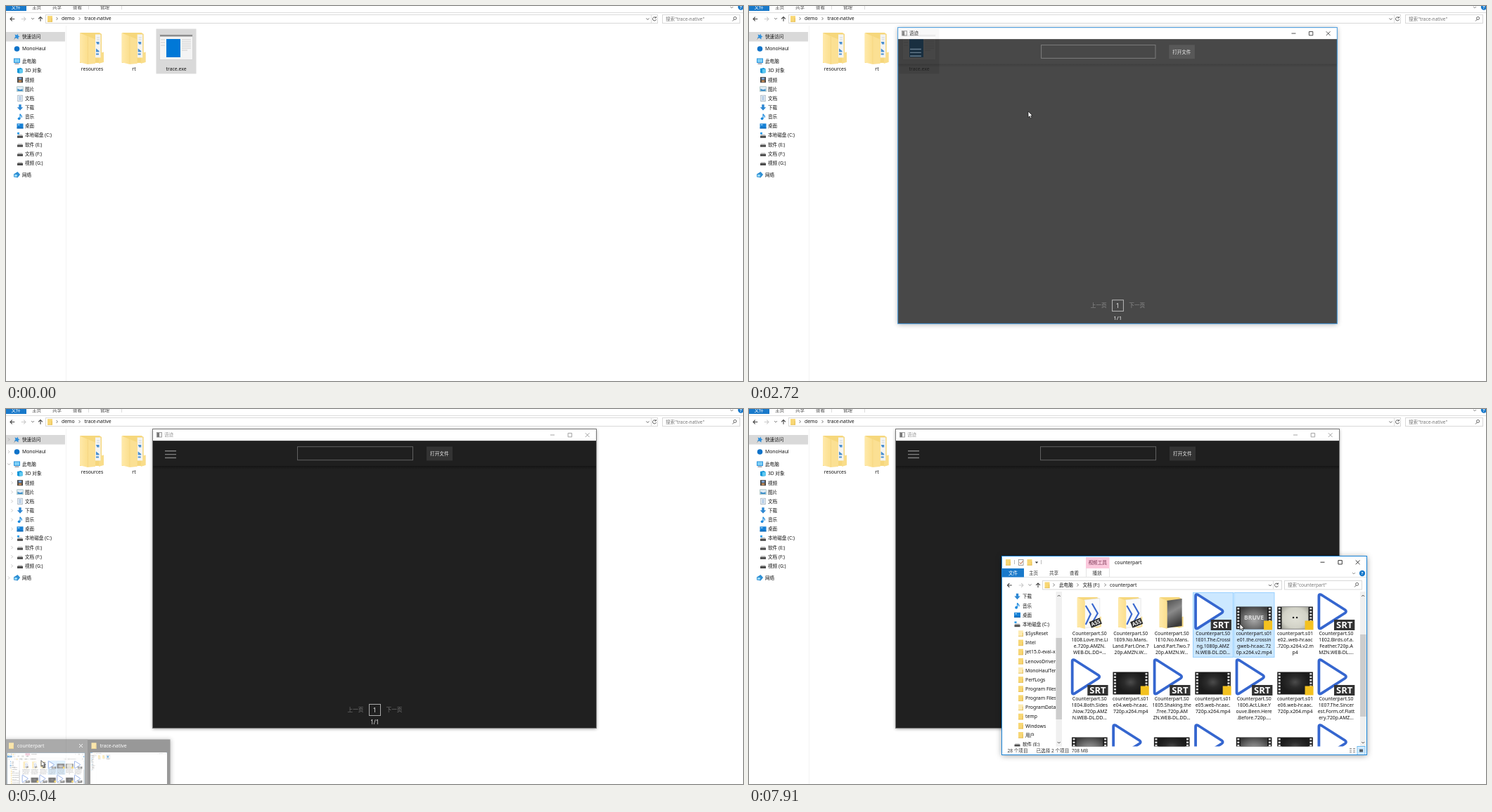
Animation, 1048 px wide and 534 px high, one loop 8000 ms. Source, as an HTML page:

```html
<!DOCTYPE html>
<html lang="zh-CN">
<head>
<meta charset="utf-8">
<style>
html,body{margin:0;width:100%;height:100%;overflow:hidden;background:#fff}
svg{display:block;width:100%;height:100%}
text{font-family:"Noto Sans","Noto Sans CJK SC",sans-serif;white-space:pre}
</style>
</head>
<body>
<svg id="stage" viewBox="0 0 1048 534"></svg>
<script>
const BLUE = '#0078d7', TAB = '#1979ca';

// --- drawing helpers -------------------------------------------------
const rect = (x, y, w, h, fill, extra = '') =>
  `<rect x="${x}" y="${y}" width="${w}" height="${h}" fill="${fill}" ${extra}/>`;
const line = (d, color, w = 1, extra = '') =>
  `<path d="${d}" fill="none" stroke="${color}" stroke-width="${w}" ${extra}/>`;
const shape = (d, fill, extra = '') => `<path d="${d}" fill="${fill}" ${extra}/>`;
const disc = (x, y, r, fill) => `<circle cx="${x}" cy="${y}" r="${r}" fill="${fill}"/>`;
const move = (x, y, body) => `<g transform="translate(${x} ${y})">${body}</g>`;
const text = (x, y, s, fill = '#111', extra = '', size = /[\u4e00-\u9fff]/.test(s) ? 6.6 : 6.85) =>
  `<text x="${x}" y="${(y + size * .36).toFixed(2)}" font-size="${size}" fill="${fill}" ${extra}>${s}</text>`;
const mid = 'text-anchor="middle"';

const chevR = (x, y, c = '#555') => line(`M${x - 1} ${y - 2}l2 2l-2 2`, c, .8);
const chevD = (x, y, c = '#555') => line(`M${x - 2} ${y - 1}l2 2l2 -2`, c, .9);
const arrow = (x, y, c, turn) =>
  `<g transform="translate(${x} ${y}) rotate(${turn})">${line('M3.3 0H-3M-.2 -2.9L-3 0L-.2 2.9', c, 1.1)}</g>`;
const help = (x, y) => disc(x, y, 4.2, TAB) + text(x, y, '?', '#fff', mid + ' font-weight="700"', 6);
const miniFolder = (x, y, c = '#f8d775') =>
  rect(x - 3.5, y - 4.2, 7, 8.4, c) + line(`M${x - 3.5} ${y + 4}h7M${x + 2.8} ${y - 1}v5`, '#e3b94d', .8);
const frame = (x, y, w, h, c = '#d9d9d9') => rect(x + .5, y + .5, w, h, 'none', `stroke="${c}"`);
const buttons = (x, y, gap, c) =>
  line(`M${x - 3} ${y}h6M${x + gap - 2.6} ${y - 2.6}h5.4v5.4h-5.4z` +
       `M${x + 2 * gap - 2.8} ${y - 2.8}l5.8 5.8m0 -5.8l-5.8 5.8`, c, .9);

const icons = {
  star: line('M-4 4L0 0', '#777', .8) + shape('M1 -4L2 -1L4 0L2 1L2 4L-1 2L-4 2L-2 0L-3 -3L0 -2z', '#2e8fdc'),
  dot: disc(0, 0, 3.8, '#0f73c9'),
  pc: rect(-4.5, -4, 9, 6.5, '#2a93dc') + rect(-3.5, -3, 7, 4.5, '#7fd0f7') + rect(-3, 3.2, 6, 1, '#667'),
  cube: shape('M-4 -3L1 -4L4 -2V3L-1 4L-4 3z', '#1496d8') + shape('M-1 -2L4 -2V3L-1 4z', '#5fc8f0'),
  film: rect(-4, -4, 8, 8, '#444') + rect(-2.2, -3, 4.4, 2.6, '#7ea6d8') + rect(-2.2, .6, 4.4, 2.6, '#c98e58'),
  pic: rect(-4.3, -3.5, 8.6, 7, '#dfeaf3', 'stroke="#8aa" stroke-width=".6"') + shape('M-3.6 2.8V-.5L0 1L3.6 0V2.8z', '#3d8fc9'),
  doc: rect(-3.2, -4.2, 6.4, 8.4, '#fff', 'stroke="#8498ac" stroke-width=".7"') + line('M-2 -2h4M-2 0h4M-2 2h4', '#5d8fc6', .8),
  down: shape('M-1.7 -4.3H1.7V-.4H4.2L0 4.2L-4.2 -.4H-1.7z', '#2d87d3'),
  note: line('M0 2.5V-4C1 -2 3 -2 2.4 1', '#1c8ade', 1.2) + disc(-1.4, 2.6, 1.9, '#1c8ade'),
  desk: rect(-4.5, -3.5, 9, 7, '#1681d6') + rect(-3.2, -2.4, 2.6, 1.4, '#9fd4fa') + rect(-4.5, 2.4, 9, 1.1, '#0d5ea8'),
  disk: rect(-4, .5, 8, 3, '#4c4c4c') + shape('M-3 -1H3L4 .5H-4z', '#aaa'),
  sys: rect(-4, .8, 8, 3, '#4c4c4c') + shape('M-3 -.8H3L4 .8H-4z', '#aaa') + rect(-4, -4, 3, 2.6, '#2a9be8'),
  net: shape('M-4.5 -1L1 -4.4L4.6 -.6L1 4L-1 3.6L-4.5 3z', '#2e8fd4') + rect(-3.6, -.4, 4, 2.8, '#9adcf9'),
  folder: miniFolder(0, 0), pale: miniFolder(0, 0, '#fdebb4')
};

const folder = (x, y, inside) => move(x, y,
  shape('M0 1.5L2 1H28L31 3V44H0z', '#f6d77c') +
  shape('M28 30L34 28.5V43L27 45z', '#f9dd8a') + inside +
  shape('M0 1.5L10 5.5Q11 6 11 8V46L1 43.5Q0 43 0 42z', 'url(#flap)'));
const pages = rect(22, 3.5, 7.5, 33, '#f4f4f2') + line('M24 8h4M24 11h4', '#c9d3dc', .9) +
  shape('M23 14h4.5v3.5h-3zM23 23.5l4.5 3.5v1.5h-4.5zM23 30.5h4v2h-4z', '#4a8fd0') +
  shape('M11 6L21 10Q22 10.5 22 12V45L11 46z', '#fbe093') + line('M11 7V45.5', '#efca6c', .8);
const assBadge = (x, y) => `<g transform="translate(${x} ${y}) rotate(-22)">` +
  rect(-8, -4.5, 16, 9, '#2d2d2d') + text(0, 0, 'ASS', '#fff', mid + ' font-weight="700"', 7.5) + '</g>';
const subs = shape('M10 5L32 2.5V42L10 45z', '#fafafa', 'stroke="#ddd" stroke-width=".6"') +
  line('M12 13L19 25L12 40M21 10L29 24L22 36', '#3a68d0', 2.2) + assBadge(26, 37.5);
const photo = shape('M10 6L32 3V42L10 45z', 'url(#dusk)');

const exeIcon = rect(218.5, 40.5, 47, 36, '#f4f4f4', 'stroke="#ccc" stroke-width=".7"') +
  rect(219, 41, 46, 2.5, '#8d8d8d') + rect(228, 47, 20, 26, BLUE) +
  line('M220 48h6m-6 4h6m-6 4h6M250 48h13m-13 3h13m-13 3h13m-13 3h13m-13 3h13m-13 3h8', '#c3c3c3', .8);

// --- file browser behind everything -----------------------------------
const nav = [
  ['star', 43.5, '快速访问', 0], ['dot', 61, 'MonoHaul', 0], ['pc', 78.5, '此电脑', 0],
  ...['cube 3D 对象', 'film 视频', 'pic 图片', 'doc 文档', 'down 下载', 'note 音乐', 'desk 桌面',
    'sys 本地磁盘 (C:)', 'disk 软件 (E:)', 'disk 文档 (F:)', 'disk 视频 (G:)'].map((s, i) => {
      const k = s.indexOf(' ');
      return [s.slice(0, k), 92 + i * 13.15, s.slice(k + 1), 1];
    }),
  ['net', 240.5, '网络', 0]
];

const base = rect(0, 0, 1048, 534, '#fff') + rect(0, 0, 29, 7, TAB) +
  text(14, 1.5, '文件', '#fff', mid) +
  [[43.5, '主页'], [72.5, '共享'], [101.5, '查看'], [140.5, '管理']].map(([x, s]) => text(x, 1.5, s, '#444', mid)).join('') +
  line('M117.5 0V5M164.5 0V5M0 9.5H1048', '#dcdcdc') + chevD(1032, 2, '#888') + help(1045, 1.5) +
  arrow(9, 18.5, '#444', 0) + arrow(25, 18.5, '#ccc', 180) + chevD(38, 18, '#777') + arrow(49, 18.5, '#444', 90) +
  frame(56, 12, 870, 12) + miniFolder(62.5, 18.3) + chevR(72.5, 18) + text(79, 18, 'demo') +
  chevR(104.5, 18) + text(111.5, 18, 'trace-native') + chevD(912.5, 18.5) + line('M917.5 13v11', '#ddd') +
  line('M924 16.6A2.6 2.6 0 1 0 924.6 19M924.4 15v2h-2', '#555', .9) +
  frame(933, 12, 110, 12) + text(938, 18.5, '搜索"trace-native"', '#777') +
  line('M1033 21.5l2.5 -2.5M1038.6 17.4a2 2 0 1 0 -4 0a2 2 0 1 0 4 0', '#555', .9) +
  rect(0, 37, 84, 13.5, '#d9d9d9') + line('M85.5 28V534', '#f3f3f3') +
  nav.map(([k, y, s, sub]) => move(sub ? 20 : 15.5, y, icons[k]) + text(sub ? 27 : 23, y, s)).join('') +
  folder(105, 37, pages) + text(122.5, 90, 'resources', '#111', mid) +
  folder(164.7, 37, pages) + text(182, 90, 'rt', '#111', mid) +
  rect(213.5, 32.5, 57, 64, '#d9d9d9', 'id="pick"') + exeIcon + text(242, 90, 'trace.exe', '#111', mid);

const twigs = nav.map(([, y, s, sub]) => s === '此电脑' ? '' : chevR(sub ? 8.5 : 4, y, '#777')).join('');

// --- dark application window -------------------------------------------
const app = rect(208.5, 28.5, 631, 426, '#fff', 'id="appShadow"') +
  rect(208.5, 45.4, 631, 409.1, '#202020') + rect(208.5, 45.4, 631, 35.6, '#1f1f1f') + rect(208.5, 81, 631, 5, 'url(#under)') +
  `<g id="caption" color="#111">` + rect(214.5, 33.5, 7, 6.5, '#eee', 'stroke="#888" stroke-width=".8"') +
  rect(215, 34, 3, 6, '#777') + text(225, 37, '语迹', 'currentColor') + buttons(777, 37, 24.8, 'currentColor') + '</g>' +
  line('M226 59.7h16m-16 4.9h16m-16 4.9h16', '#808080', 1.4) +
  frame(414, 53.2, 164, 19, '#606060') + rect(598, 53.5, 37, 20, '#333') + text(616.3, 63.5, '打开文件', '#eee', mid) +
  text(497, 428.5, '上一页', '#757575', mid, 7.7) + frame(516, 420, 16, 16, '#aaa') +
  text(524.2, 428.5, '1', '#eee', mid, 8.5) + text(552, 428.5, '下一页', '#757575', mid, 7.7) +
  text(524.3, 446.5, '1/1', '#eee', mid, 8) +
  rect(208.5, 28.5, 631, 426, 'none', 'id="appEdge" stroke="#1883d7"');

// --- second file browser -----------------------------------------------
const tail = n => `counterpart.s01|e0${n}.web-hr.aac.|720p.x264.mp4`;
const cells = [
  ['ass', 'Counterpart.S0|1E08.Love.the.Li|e.720p.AMZN.|WEB-DL.DD+...'],
  ['ass', 'Counterpart.S0|1E09.No.Mans.|Land.Part.One.7|20p.AMZN.W...'],
  ['pic', 'Counterpart.S0|1E10.No.Mans.|Land.Part.Two.7|20p.AMZN.W...'],
  ['srt', 'Counterpart.S0|1E01.The.Crossi|ng.1080p.AMZ|N.WEB-DL.DD...'],
  ['word', 'counterpart.s01|e01.the.crossin|gweb-hr.aac.72|0p.x264.v2.mp4'],
  ['pale', 'counterpart.s01|e02..web-hr.aac|.720p.x264.v2.m|p4'],
  ['srt', 'Counterpart.S0|1E02.Birds.of.a.|Feather.720p.A|MZN.WEB-DL....'],
  ['srt', 'Counterpart.S0|1E04.Both.Sides|.Now.720p.AMZ|N.WEB-DL.DD...'],
  ['mp4', tail(4)],
  ['srt', 'Counterpart.S0|1E05.Shaking.the|.Tree.720p.AM|ZN.WEB-DL.DD...'],
  ['mp4', tail(5)],
  ['srt', 'Counterpart.S0|1E06.Act.Like.Y|ouve.Been.Here|.Before.720p....'],
  ['mp4', tail(6)],
  ['srt', 'Counterpart.S0|1E07.The.Sincer|est.Form.of.Flatt|ery.720p.AMZ...'],
  ...['lite', 'srt', 'mp4', 'srt', 'lite', 'mp4', 'srt'].map(k => [k, ''])
];

const clip = (fill, inside = '') => rect(-25.3, 19.5, 50.6, 32, '#1b1b1b') + rect(-19, 20, 38, 31, fill) + inside +
  line('M-22.3 21V51M22.3 21V51', '#dcdcdc', 3, 'stroke-dasharray="2.6 1.8"') + rect(14, 39.5, 12, 13, '#f3c11f');
const art = {
  ass: folder(-17.5, 5, subs), pic: folder(-17.5, 5, photo),
  srt: shape('M-24.6 4.5C-24.6 1.5 -22.5 1.8 -20.5 3L12.5 24Q15.5 26.2 12.5 28.5L-20.5 49.7C-22.5 51 -24.6 51 -24.6 48.5z', '#fff',
    'stroke="#3566cf" stroke-width="3.8"') + rect(-3, 38, 29.3, 15, '#333') +
    text(11.6, 45.6, 'SRT', '#fff', mid + ' font-weight="600"', 13),
  mp4: clip('url(#dim)'), lite: clip('url(#glow)'),
  word: clip('url(#glow)', text(0, 35, 'BRUVE', '#eee', mid + ' font-weight="600" opacity=".8"', 8.5)),
  pale: clip('url(#paper)', disc(-2.5, 35, 1.3, '#222') + disc(2.5, 35, 1.3, '#222'))
};
const cell = ([kind, label], i) => move(484.3 + i % 7 * 58.45, 262 + Math.floor(i / 7) * 93, art[kind] +
  label.split('|').map((s, n) => text(0, 57.5 + n * 9.15, s, '#111', mid)).join(''));

const tree = ['down 下载', 'note 音乐', 'desk 桌面', 'sys 本地磁盘 (C:)', 'pale $SysReset', 'folder Intel',
  'folder jet15.0-eval-x', 'folder LenovoDriver', 'pale MonoHaulTem', 'folder PerfLogs', 'folder Program Files',
  'folder Program Files', 'pale ProgramData', 'folder temp', 'folder Windows', 'folder 用户', 'disk 软件 (E:)'];
const treeRow = (s, i) => {
  const k = s.indexOf(' '), kind = s.slice(0, k), y = 267 + i * 13.15, deep = /pale|folder/.test(kind) ? 1 : 0;
  return move(381.5 + deep * 5, y, icons[kind]) + text(389 + deep * 4, y, s.slice(k + 1));
};
const scroll = (x, y, h) => rect(x, 260, 8.5, 220.5, '#f0f0f0') + rect(x, y, 8.5, h, '#cdcdcd') +
  line(`M${x + 2.2} 267l2 -2l2 2M${x + 2.2} 474l2 2l2 -2`, '#555', 1);

const browser = rect(359.5, 209.5, 519, 283, '#fff') +
  miniFolder(368.5, 218.3) + line('M377.5 215v6M415.5 215v6', '#aaa', .8) +
  rect(383.5, 214.5, 6.5, 8, '#fff', 'stroke="#888" stroke-width=".8"') + line('M385 218.5l1.5 2l3 -4', '#b5562c', 1) +
  miniFolder(399, 218.3) + shape('M406.8 217.5h4.4l-2.2 2.6z', '#333') +
  rect(479, 211, 33.5, 16, '#fbc8dc') + text(495.7, 219, '视频工具', '#7a3553', mid) + text(520, 218.5, 'counterpart') +
  buttons(815.5, 218.2, 25, '#222') +
  rect(360, 227, 31, 12.5, TAB) + text(375.5, 233.3, '文件', '#fff', mid) +
  [[404.5, '主页'], [433.5, '共享'], [462.5, '查看'], [495.2, '播放']].map(([x, s]) => text(x, 233.3, s, '#333', mid)).join('') +
  line('M391 239.5H879M479.5 227v12M512.5 227v12', '#e4e4e4') + chevD(860, 234, '#888') + help(872, 234) +
  arrow(370.5, 251, '#444', 0) + arrow(387, 251, '#ccc', 180) + chevD(399.5, 250.5, '#777') + arrow(411, 251, '#444', 90) +
  frame(417, 244, 340, 12.5) + miniFolder(424, 250.7) + chevR(433.5, 250.5) + text(441, 250.5, '此电脑') +
  chevR(467.5, 250.5) + text(474.5, 250.5, '文档 (F:)') + chevR(506.5, 250.5) + text(513, 250.5, 'counterpart') +
  chevD(741, 251) + line('M745.5 245v11', '#ddd') + line('M752 249A2.6 2.6 0 1 0 752.6 251.5M752.4 247.5v2h-2', '#555', .9) +
  frame(761, 244, 110, 12.5) + text(766, 250.8, '搜索"counterpart"', '#777') +
  line('M861 253.5l2.5 -2.5M866.6 249.4a2 2 0 1 0 -4 0a2 2 0 1 0 4 0', '#555', .9) +
  `<g clip-path="url(#treeBox)">${tree.map(treeRow).join('')}</g>` + scroll(436.5, 326, 116) +
  `<g clip-path="url(#listBox)">` + rect(631.5, 261.5, 57, 92, '#cce8ff', 'stroke="#99d1ff"') +
  rect(690, 261.5, 57, 92, '#cce8ff', 'id="second" stroke="#99d1ff"') + cells.map(cell).join('') + '</g>' +
  scroll(869, 321, 117) + text(367.5, 486.5, '28 个项目', '#333') +
  `<g id="status">${text(408.5, 486.5, '已选择 2 个项目  708 MB', '#333')}</g>` +
  line('M854 483.5h3m2 0h3m-8 2.5h3m2 0h3m-8 2.5h3m2 0h3', '#888', 1) +
  frame(864.5, 480, 11, 12, '#66b7ee') + rect(866, 481.5, 9, 10, '#cce8ff') + rect(868, 484.5, 5, 4, '#55606a') +
  rect(359.5, 209.5, 519, 283, 'none', 'stroke="#1883d7"');

// --- taskbar previews ----------------------------------------------------
const previews = rect(-4, 470.5, 237.5, 70, '#555', 'style="filter:drop-shadow(1px 0 3px rgba(0,0,0,.4))"') +
  `<g id="hot">${rect(0, 470.5, 116, 64, '#727272') + line('M104 477l5 5m0 -5l-5 5', '#fff', .9)}</g>` +
  miniFolder(7.5, 479.5) + text(16, 479.5, 'counterpart', '#fff') +
  miniFolder(125, 479.5) + text(133.5, 479.5, 'trace-native', '#fff') +
  '<use href="#browser" transform="translate(2 490) scale(.212) translate(-360 -210)"/>' +
  '<g clip-path="url(#shotBox)"><use href="#base" transform="translate(120 489) scale(.104)"/></g>';

const box = (id, x, y, w, h) => `<clipPath id="${id}">${rect(x, y, w, h, '#000')}</clipPath>`;
const stop = (o, c, a = 1) => `<stop offset="${o}" stop-color="${c}" stop-opacity="${a}"/>`;

const $ = id => document.getElementById(id);
$('stage').innerHTML = `<defs>
  <linearGradient id="flap">${stop(0, '#ffe9a9')}${stop(1, '#fbdf8e')}</linearGradient>
  <linearGradient id="under" x2="0" y2="1">${stop(0, '#000', .35)}${stop(1, '#000', 0)}</linearGradient>
  <linearGradient id="dusk" x2=".3" y2="1">${stop(0, '#4a4a4a')}${stop(.5, '#8a8a8a')}${stop(1, '#3c3c3c')}</linearGradient>
  <radialGradient id="dim" cy=".45">${stop(0, '#4c4c4c')}${stop(.5, '#2b2b2b')}${stop(1, '#1c1c1c')}</radialGradient>
  <radialGradient id="glow" cy=".6" r=".7">${stop(0, '#a8a8a8')}${stop(.5, '#757575')}${stop(1, '#3a3a3a')}</radialGradient>
  <radialGradient id="paper" r=".75">${stop(0, '#e2e2d8')}${stop(.6, '#d2d2c7')}${stop(1, '#96968c')}</radialGradient>
  ${box('treeBox', 360, 260, 76, 220.5)}${box('listBox', 445, 260, 424, 220.5)}${box('shotBox', 120, 489, 109, 45)}
</defs>
<g id="base">${base}</g>
<g id="twigs">${twigs}</g><g id="openTwig">${chevD(4.2, 78.5, '#555')}</g>
<g id="app">${app}</g>
<g id="browserWrap">${rect(359.5, 209.5, 519, 283, '#fff', 'style="filter:drop-shadow(0 1px 4px rgba(0,0,0,.4))"')}<g id="browser">${browser}</g></g>
<g id="previews">${previews}</g>
<g id="cursor">
  ${shape('M0 0V8.6L2 6.8L3.5 10L5 9.3L3.6 6.2H6.2z', '#fff', 'stroke="#111" stroke-width=".7"')}
  <g id="busy"><circle cx="7.5" cy=".5" r="3.1" fill="#fff" stroke="#1787dc" stroke-width="2.2"/>${line('M7.5 -2.6A3.1 3.1 0 0 1 10.6 .5', '#5cb8f2', 2.2)}</g>
</g>`;

// --- motion ----------------------------------------------------------------
const LOOP = 8000;
// bursts of screen updates: first, last, count
const bursts = [[220, 910, 10], [1240, 1240, 1], [2010, 2720, 10], [2820, 2870, 2], [3240, 3710, 7], [3870, 3950, 2],
  [4100, 4430, 5], [4580, 4890, 5], [5040, 5210, 3], [5280, 5820, 8], [5900, 6130, 4], [6280, 6280, 1],
  [6740, 6820, 2], [6970, 7680, 10], [7850, 7910, 2]];
const track = [[150, 910, 496], [910, 264, 83], [1940, 264, 83], [2720, 397, 150], [3170, 397, 150], [3710, 38, 538],
  [4500, 46, 538], [4890, 50, 500.5], [5210, 50, 500.5], [5820, 684, 336], [6130, 722, 331], [6660, 722, 331],
  [6820, 722, 320], [6900, 722, 320], [7300, 668, 322], [7680, 698, 306], [LOOP, 698, 306]];

const clamp = v => Math.min(1, Math.max(0, v));
const ramp = (t, a, b) => clamp((t - a) / (b - a));
const set = (id, attrs) => { for (const k in attrs) $(id).setAttribute(k, attrs[k]); };
const fade = (id, v) => set(id, { opacity: v });

function snap(t) {
  let last = 0;
  for (const [a, b, n] of bursts) {
    if (t < a) break;
    const step = n > 1 ? (b - a) / (n - 1) : 1;
    last = Math.min(b, a + Math.floor((t - a) / step + 1e-6) * step);
  }
  return last;
}

function pointer(t) {
  const i = Math.max(1, track.findIndex(k => k[0] >= t));
  const [a, x0, y0] = track[i - 1], [b, x1, y1] = track[i];
  const u = ramp(t, a, b), e = u * u * (3 - 2 * u);
  return [x0 + (x1 - x0) * e, y0 + (y1 - y0) * e];
}

function draw(time) {
  const t = snap(time);
  const [x, y] = pointer(t);
  set('cursor', { transform: `translate(${x} ${y})`, opacity: t < 220 ? 0 : 1 });
  fade('busy', t >= 1240 && t < 2640 ? 1 : 0);

  const hover = t >= 220 && t < 2640 && (t > 1900 || (x < 271 && y < 97));
  set('pick', { fill: hover ? '#cce8ff' : '#d9d9d9', stroke: hover ? '#99d1ff' : 'none' });

  const u = ramp(t, 2630, 2830), s = 1 - .1 * (1 - u) ** 3.85;
  set('app', {
    opacity: clamp(u * 1.816),
    transform: `translate(524 241.5) scale(${s}) translate(-524 -241.5)`
  });
  const active = t < 3870;
  set('caption', { color: active ? '#111' : '#999' });
  set('appEdge', { stroke: active ? '#1883d7' : '#777' });
  $('appShadow').style.filter = `drop-shadow(0 1px ${active ? 4 : 2}px rgba(0,0,0,.4))`;

  const shown = .4 * ramp(t, 3540, 3950) + .6 * ramp(t, 5000, 5200);
  fade('twigs', shown * (1 - ramp(t, 5300, 5800)));
  fade('openTwig', shown * (1 - ramp(t, 5300, 6280)));

  const slide = ramp(t, 4040, 4260);
  set('previews', { opacity: slide * (1 - ramp(t, 5000, 5100)), transform: `translate(0 ${8 * (1 - slide) ** 2})` });
  fade('hot', ramp(t, 4540, 4740));

  // the restored window flies out of the taskbar
  const v = ramp(t, 5040, 5250), k = (1 - v) ** 3;
  set('browserWrap', {
    opacity: clamp(v * 1.25),
    transform: `translate(${619 - 560 * k} ${351 + 255 * k}) scale(${1 - k}) translate(-619 -351)`
  });

  const single = t >= 7300 && t < 7850;
  const over = single && x > 690;
  set('second', { fill: single ? (over ? '#e5f3ff' : 'none') : '#cce8ff', stroke: single ? 'none' : '#99d1ff' });
  $('status').firstChild.textContent = single ? '已选择 1 个项目  87.3 KB' : '已选择 2 个项目  708 MB';
}

const start = performance.now();
function tick() {
  draw((performance.now() - start) % LOOP);
  requestAnimationFrame(tick);
}
tick();
</script>
</body>
</html>
```
